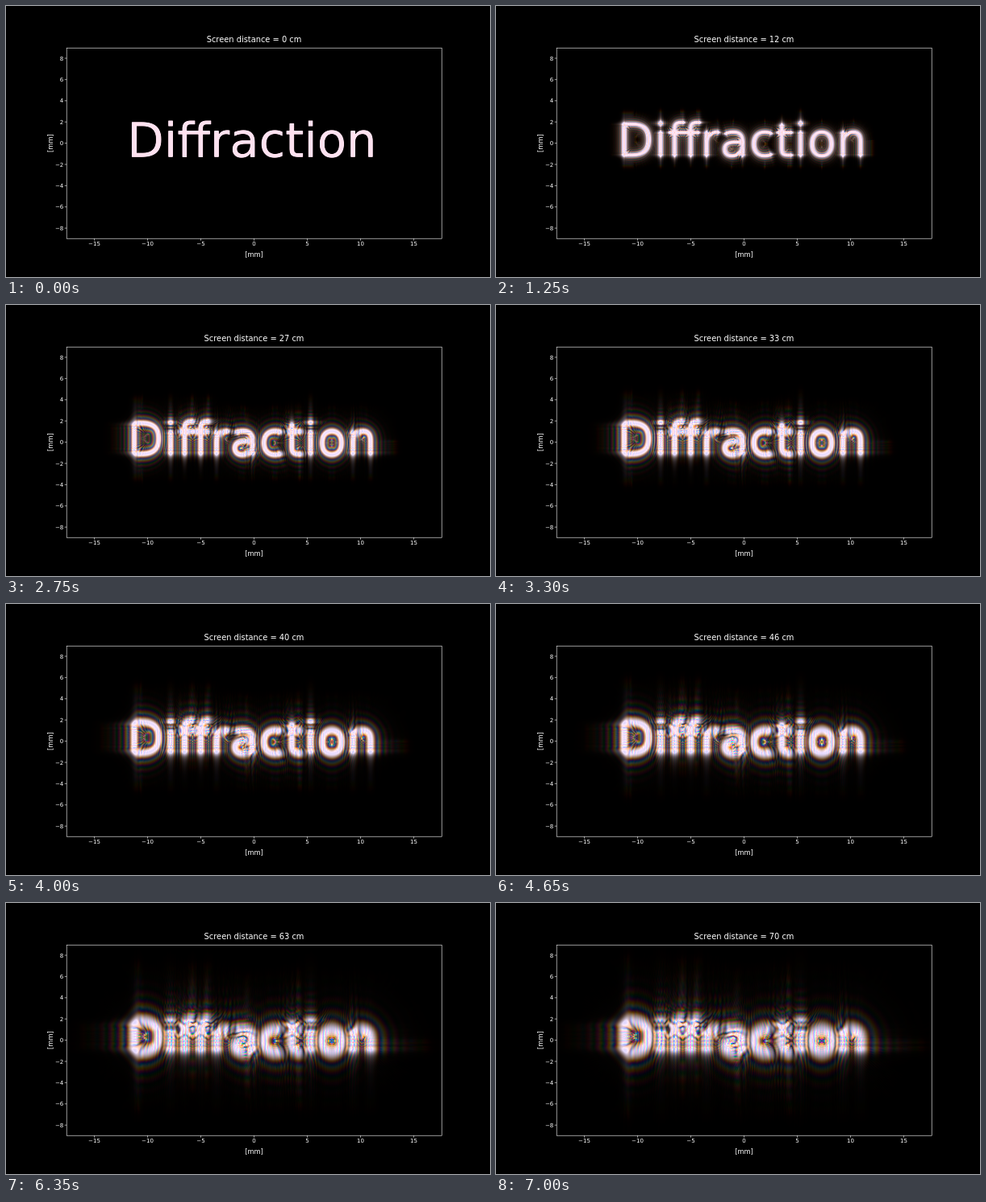
An HTML page with a canvas that plays this animation: 600 by 337 pixels, repeating every 7050 ms.

```html
<!DOCTYPE html>
<html lang="en">
<head>
<meta charset="utf-8">
<title>Diffraction</title>
<style>
html, body { margin: 0; width: 100%; height: 100%; overflow: hidden; background: #000; }
canvas { display: block; }
</style>
</head>
<body>
<canvas id="stage" width="600" height="337"></canvas>
<script>
// Fresnel diffraction of a text-shaped aperture in white light.
// A pattern depends only on s = wavelength * distance (mm^2), so patterns
// are cached per s and mixed with spectral weights for every distance.
const STEP = 50, FRAMES = 141;
const W = 1024, H = 512, B = 32;        // grid size, lines per FFT block
const SCALE = 13.2;                     // pixels per mm
const P = 2.2;                          // grid samples per pixel
const DX = 1 / (SCALE * P);             // grid spacing in mm
const X0 = 75, Y0 = 54, OW = 466, OH = 233;
const CX = 307.5, CY = 170.6;
const FONT = '"DejaVu Sans", sans-serif';
const GAIN = 2;                         // exposure; brighter light keeps its hue
const BASE = [1, 0.76, 0.87].map(v => v * GAIN);

const ctx = document.getElementById('stage').getContext('2d');

// ---- FFT over blocks of B lines at once ----
const bufR = new Float32Array(W * B), bufI = new Float32Array(W * B);
const cosT = new Float64Array(W / 2), sinT = new Float64Array(W / 2);
for (let k = 0; k < W / 2; k++) {
  cosT[k] = Math.cos(2 * Math.PI * k / W);
  sinT[k] = -Math.sin(2 * Math.PI * k / W);
}

function bitReversal(n) {
  const rev = new Uint16Array(n);
  for (let i = 1; i < n; i++) rev[i] = (rev[i >> 1] >> 1) | (i & 1 ? n >> 1 : 0);
  return rev;
}
const revW = bitReversal(W), revH = bitReversal(H);

function fft(n) {
  for (let half = 1; half < n; half *= 2) {
    const stride = W / 2 / half;
    for (let k = 0; k < half; k++) {
      const c = cosT[k * stride], s = sinT[k * stride];
      for (let i = k; i < n; i += 2 * half) {
        let p = i * B, q = (i + half) * B;
        for (const end = p + B; p < end; p++, q++) {
          const a = bufR[q], b = bufI[q];
          const tr = a * c - b * s, ti = a * s + b * c;
          const ur = bufR[p], ui = bufI[p];
          bufR[p] = ur + tr; bufI[p] = ui + ti;
          bufR[q] = ur - tr; bufI[q] = ui - ti;
        }
      }
    }
  }
}

// Free-space phase along one axis
function chirp(n, s) {
  const re = new Float32Array(n), im = new Float32Array(n);
  for (let k = 0; k < n; k++) {
    const f = Math.min(k, n - k) / (n * DX);
    const phase = Math.PI * s * f * f;
    re[k] = Math.cos(phase);
    im[k] = Math.sin(phase);
  }
  return { re, im };
}

const field = () => ({ re: new Float32Array(W * H), im: new Float32Array(W * H) });

function columnPass(src, dst, h) {
  for (let c = 0; c < W; c += B) {
    for (let k = 0; k < H; k++) {
      const hr = h.re[k], hi = h.im[k], o = revH[k] * B, g = k * W + c;
      for (let j = 0; j < B; j++) {
        const a = src.re[g + j], b = src.im[g + j];
        bufR[o + j] = a * hr - b * hi;
        bufI[o + j] = a * hi + b * hr;
      }
    }
    fft(H);
    for (let k = 0; k < H; k++) {
      const o = k * B, g = k * W + c;
      for (let j = 0; j < B; j++) {
        dst.re[g + j] = bufR[o + j];
        dst.im[g + j] = bufI[o + j];
      }
    }
  }
}

// Transforms rows first..last and hands each row (offset j in the block) on
function rowPass(src, h, first, last, emit) {
  for (let r = first; r < last; r += B) {
    for (let k = 0; k < W; k++) {
      const hr = h.re[k], hi = h.im[k], o = revW[k] * B;
      for (let j = 0, g = r * W + k; j < B; j++, g += W) {
        const a = src.re[g], b = src.im[g];
        bufR[o + j] = a * hr - b * hi;
        bufI[o + j] = a * hi + b * hr;
      }
    }
    fft(W);
    for (let j = 0; j < B; j++) emit(r + j, j);
  }
}

// ---- Aperture and its conjugate spectrum ----
function makeSpectrum() {
  const c = document.createElement('canvas');
  c.width = W; c.height = H;
  const g = c.getContext('2d', { willReadFrequently: true });
  g.scale(P, P);
  g.translate(-X0, -Y0);
  g.fillStyle = '#fff';
  g.font = '59.2px ' + FONT;
  g.fillText('Diffraction', 150.2, 187.8);
  const px = g.getImageData(0, 0, W, H).data;
  const f = field(), flat = chirp(W, 0);
  for (let i = 0; i < W * H; i++) f.re[i] = px[i * 4 + 3] / 255;
  rowPass(f, flat, 0, H, (y, j) => {
    for (let k = 0; k < W; k++) {
      f.re[y * W + k] = bufR[k * B + j];
      f.im[y * W + k] = bufI[k * B + j];
    }
  });
  columnPass(f, f, flat);
  for (let i = 0; i < W * H; i++) f.im[i] = -f.im[i];
  return f;
}
const spectrum = makeSpectrum(), work = field();

// Area shares of each grid sample on the pixel row/column it falls in
function shares(n) {
  const at = new Uint16Array(n), lo = new Float32Array(n), hi = new Float32Array(n);
  for (let i = 0; i < n; i++) {
    const a = i / P, b = (i + 1) / P, edge = Math.floor(b + 1e-9);
    at[i] = Math.floor(a + 1e-9);
    lo[i] = edge > at[i] ? edge - a : 1 / P;
    hi[i] = 1 / P - lo[i];
  }
  return { at, lo, hi };
}
const shareX = shares(W), shareY = shares(H);

// ---- Patterns ----
const S0 = 0.02, DS = 0.02;
const sOf = j => S0 * (Math.exp(DS * j) - 1);
const jOf = s => Math.log(1 + s / S0) / DS;

function rowRange(s) {
  const reach = s / (2 * DX * DX) + 6;
  return [
    Math.max(0, Math.floor((190 - reach) / B) * B),
    Math.min(H, Math.ceil((300 + reach) / B) * B)
  ];
}

function makePattern(s) {
  const out = new Float32Array(OW * OH), line = new Float32Array(OW + 1);
  const [first, last] = rowRange(s);
  columnPass(spectrum, work, chirp(H, s));
  rowPass(work, chirp(W, s), first, last, (y, j) => {
    line.fill(0);
    for (let k = 0; k < W; k++) {
      const a = bufR[k * B + j], b = bufI[k * B + j];
      const amp = Math.sqrt(a * a + b * b) / (W * H);
      const x = shareX.at[k];
      line[x] += amp * shareX.lo[k];
      line[x + 1] += amp * shareX.hi[k];
    }
    const o = shareY.at[y] * OW, lo = shareY.lo[y], hi = shareY.hi[y];
    for (let x = 0; x < OW; x++) {
      out[o + x] += line[x] * lo;
      if (hi > 1e-6 && o + OW + x < out.length) out[o + OW + x] += line[x] * hi;
    }
  });
  for (let i = 0; i < out.length; i++) out[i] *= out[i];
  return out;
}

const cache = new Map();
function pattern(j) {
  if (!cache.has(j)) cache.set(j, makePattern(sOf(j)));
  return cache.get(j);
}

// ---- Colour ----
const bell = (x, mu, a, b) => Math.exp(-0.5 * ((x - mu) / (x < mu ? a : b)) ** 2);

function spectralRGB(nm) {
  const x = 1.056 * bell(nm, 599.8, 37.9, 31) + 0.362 * bell(nm, 442, 16, 26.7) - 0.065 * bell(nm, 501.1, 20.4, 26.2);
  const y = 0.821 * bell(nm, 568.8, 46.9, 40.5) + 0.286 * bell(nm, 530.9, 16.3, 31.1);
  const z = 1.217 * bell(nm, 437, 11.8, 36) + 0.681 * bell(nm, 459, 26, 13.8);
  return [
    3.2406 * x - 1.5372 * y - 0.4986 * z,
    -0.9689 * x + 1.8758 * y + 0.0415 * z,
    0.0557 * x - 0.204 * y + 1.057 * z
  ];
}

const LEVELS = 4095;
const gamma = new Uint8ClampedArray(LEVELS + 1);
for (let i = 0; i <= LEVELS; i++) {
  const v = i / LEVELS;
  gamma[i] = 255 * (v <= 0.0031308 ? 12.92 * v : 1.055 * v ** (1 / 2.4) - 0.055);
}
const encode = v => gamma[v <= 0 ? 0 : v >= 1 ? LEVELS : (v * LEVELS + 0.5) | 0];

// Pattern indices with their RGB weights at distance z (mm)
function mixAt(z) {
  if (z === 0) return [{ j: 0, w: BASE }];
  const mix = [], sum = [0, 0, 0];
  const end = jOf(680e-6 * z);
  for (let j = Math.ceil(jOf(405e-6 * z)); j <= end; j++) {
    const s = sOf(j);
    const w = spectralRGB(s / z * 1e6).map(v => v * (s + S0));
    w.forEach((v, i) => { sum[i] += v; });
    mix.push({ j, w });
  }
  for (const m of mix) m.w = m.w.map((v, i) => v / sum[i] * BASE[i]);
  return mix;
}

const image = ctx.createImageData(OW, OH);
const light = [0, 1, 2].map(() => new Float32Array(OW * OH));

function drawLight(z) {
  const [R, G, L] = light;
  light.forEach(a => a.fill(0));
  for (const { j, w: [r, g, b] } of mixAt(z)) {
    const p = pattern(j);
    const [first, last] = rowRange(sOf(j));
    const from = Math.floor(first / P) * OW;
    const to = Math.min(OH, Math.ceil(last / P)) * OW;
    for (let i = from; i < to; i++) {
      const v = p[i];
      R[i] += v * r; G[i] += v * g; L[i] += v * b;
    }
  }
  const d = image.data;
  for (let i = 0, o = 0; i < OW * OH; i++, o += 4) {
    const fit = 1 / Math.max(1, R[i], G[i], L[i]);
    d[o] = encode(R[i] * fit);
    d[o + 1] = encode(G[i] * fit);
    d[o + 2] = encode(L[i] * fit);
    d[o + 3] = 255;
  }
  ctx.putImageData(image, X0, Y0);
}

// ---- Axes ----
function label(text, x, y, size, align = 'center') {
  ctx.font = size + 'px ' + FONT;
  ctx.textAlign = align;
  ctx.fillText(text, x, y);
}

function tick(x1, y1, x2, y2) {
  ctx.beginPath();
  ctx.moveTo(x1, y1);
  ctx.lineTo(x2, y2);
  ctx.stroke();
}

const signed = v => String(v).replace('-', '\u2212');

function drawAxes(cm) {
  const left = 75.2, right = 540.2, top = 52.2, bottom = 289.2;
  ctx.fillStyle = ctx.strokeStyle = '#fff';
  ctx.lineWidth = 0.6;
  ctx.strokeRect(left, top, right - left, bottom - top);
  for (let v = -15; v <= 15; v += 5) {
    const x = CX + v * SCALE;
    tick(x, bottom, x, bottom + 2.5);
    label(signed(v), x, 298.2, 7);
  }
  for (let v = -8; v <= 8; v += 2) {
    const y = CY - v * SCALE;
    tick(left - 2.5, y, left, y);
    label(signed(v), 71.3, y + 2.5, 7, 'right');
  }
  label('[mm]', CX, 312, 8.3);
  ctx.save();
  ctx.translate(58, CY);
  ctx.rotate(-Math.PI / 2);
  label('[mm]', 0, 0, 8.3);
  ctx.restore();
  label('Screen distance = ' + Math.floor(cm) + ' cm', CX, 44.9, 9.85);
}

// ---- Loop ----
let start = null, shown = -1;

function tickFrame(now) {
  if (start === null) start = now;
  const n = Math.floor(Math.max(0, now - start) / STEP) % FRAMES;
  if (n !== shown) {
    shown = n;
    const cm = n / 2;
    ctx.fillStyle = '#000';
    ctx.fillRect(0, 0, 600, 337);
    drawLight(cm * 10);
    drawAxes(cm);
  }
  requestAnimationFrame(tickFrame);
}
requestAnimationFrame(tickFrame);
</script>
</body>
</html>
```
